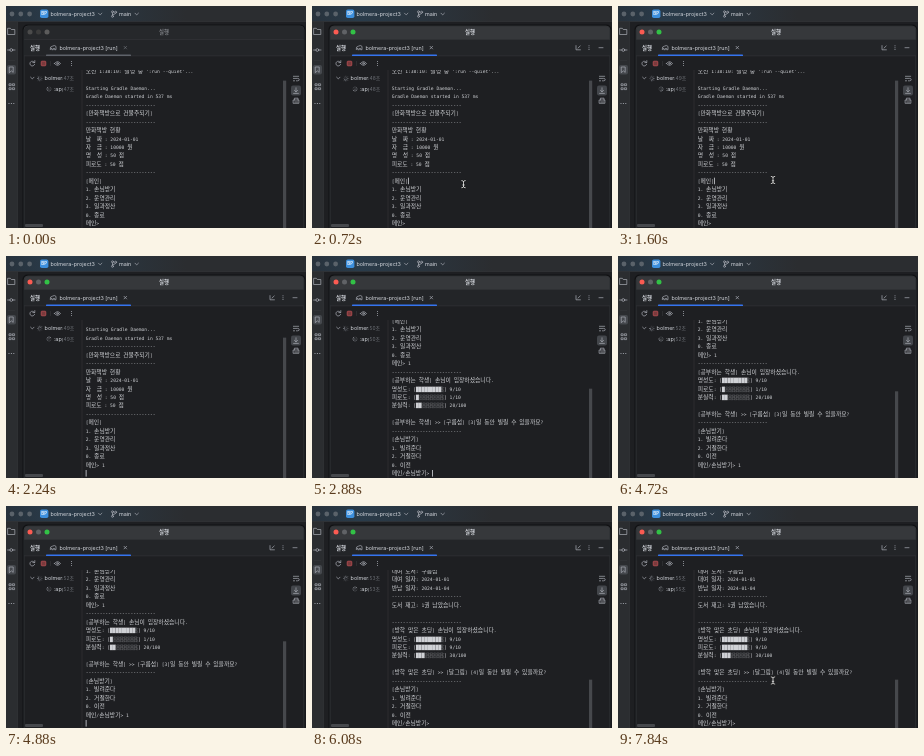
These frames come from a looping animation (300x222 px, 8000 ms). An HTML page:

```html
<!DOCTYPE html>
<html lang="ko">
<head>
<meta charset="utf-8">
<title>Run console</title>
<style>
html, body { margin: 0; width: 100%; height: 100%; overflow: hidden; background: #1e1f22; }
svg { display: block; width: 300px; height: 222px; }
text { white-space: pre; }
.ui { font-family: Inter, "Noto Sans CJK KR", "Noto Sans CJK", sans-serif; font-size: 5.4px; fill: #d5d8de; }
.dim { fill: #6d7076; }
.clock { font-size: 4.9px; }
.log { font-family: "DejaVu Sans Mono", "Liberation Mono", monospace; font-size: 4.65px; fill: #cfd1d5; }
.ko { font-family: "Noto Sans CJK KR", "Noto Sans CJK", sans-serif; font-size: 5.8px; }
.icon { fill: none; stroke: #a9adb5; stroke-width: .7; stroke-linecap: round; stroke-linejoin: round; }
.rule { stroke: #36383c; stroke-width: .6; }
.thumb { fill: #46484c; }
#title { fill: #36383b; }
#underline { fill: #3574f0; }
.idle #title { fill: #26282b; }
.idle #underline { fill: #5f636a; }
.idle #heading, .idle #close { opacity: .5; }
.idle #actions { display: none; }
.idle #lights { filter: grayscale(1) brightness(.6); }
</style>
</head>
<body>
<svg id="stage" viewBox="0 0 300 222">
  <defs>
    <linearGradient id="tint">
      <stop offset="0" stop-color="#28323c"/>
      <stop offset=".16" stop-color="#293b4a"/>
      <stop offset=".6" stop-color="#2b2d30"/>
    </linearGradient>
    <clipPath id="view"><path d="M76 64H283V222H76Z"/></clipPath>
    <clipPath id="tree"><path d="M20 64H56.5V100H20Z"/></clipPath>
  </defs>

  <!-- main window -->
  <rect width="300" height="222" fill="#1e1f22"/>
  <rect width="300" height="15.5" fill="url(#tint)"/>
  <rect y="15.5" width="11.5" height="207" fill="#2b2d30"/>
  <path class="rule" d="M0 15.5H300M11.5 15.5V222"/>
  <g fill="#5a626a"><circle cx="6" cy="8" r="2.4"/><circle cx="14.8" cy="8" r="2.4"/><circle cx="23.6" cy="8" r="2.4"/></g>
  <rect x="34" y="3.6" width="8.4" height="8.4" rx="1.8" fill="#3c8fdd"/>
  <text class="ui" x="38.2" y="9.4" text-anchor="middle" style="font-size:4.4px;font-weight:600;fill:#fff">BP</text>
  <text class="ui" x="44.5" y="9.8">bolmera-project3</text>
  <text class="ui" x="113" y="9.8">main</text>
  <g class="icon">
    <path d="M92.5 7.2l1.7 1.7 1.7-1.7M129 7.2l1.7 1.7 1.7-1.7"/>
    <circle cx="106.5" cy="5.8" r="1"/><circle cx="106.5" cy="10.3" r="1"/><circle cx="109.6" cy="6.2" r="1"/>
    <path d="M106.5 6.8V9.3M109.6 7.2q0 1.3-3 1.5"/>
    <path d="M2 22.3h2.3l1 1.2h3.5v5H2Z"/>
    <circle cx="5.3" cy="44" r="1.4"/><path d="M1.6 44h2.3M6.7 44h2.3"/>
    <path d="M3.4 77.8h1.8v1.8H3.4ZM6.8 77.8h1.8v1.8H6.8ZM3.4 81.8h1.8v1.8H3.4ZM6.8 81.8h1.8v1.8H6.8Z"/>
  </g>
  <path class="rule" d="M2 54.5H9"/>
  <rect x="1" y="59" width="9" height="9.5" rx="2" fill="#45484d"/>
  <path class="icon" d="M3.6 61h3.6v5.4l-1.8-1.5-1.8 1.5Z"/>
  <g fill="#a9adb5"><circle cx="3" cy="97.5" r=".6"/><circle cx="5.4" cy="97.5" r=".6"/><circle cx="7.8" cy="97.5" r=".6"/></g>

  <!-- run window -->
  <rect x="16.5" y="18.5" width="283" height="210" rx="5" fill="#111214"/>
  <rect x="18" y="20" width="280" height="210" rx="4" fill="#1e1f22" stroke="#46484c" stroke-width=".5"/>
  <path id="title" d="M18.3 33.5V24q0-3.7 3.7-3.7H294q3.7 0 3.7 3.7V33.5Z"/>
  <rect x="18.3" y="33.5" width="279.4" height="16" fill="#232528"/>
  <path class="rule" d="M18.3 33.5H297.7M18.3 49.8H297.7"/>
  <g id="lights">
    <circle cx="24" cy="26" r="2.5" fill="#fb5b52"/>
    <circle cx="32.5" cy="26" r="2.5" fill="#606266"/>
    <circle cx="41" cy="26" r="2.5" fill="#32c146"/>
  </g>
  <text id="heading" class="ui" x="158" y="27.8" text-anchor="middle" font-weight="600">실행</text>
  <text class="ui" x="24" y="43.7" font-weight="600">실행</text>
  <text class="ui" x="53.5" y="43.7">bolmera-project3 [run]</text>
  <rect id="underline" x="40" y="48.6" width="85" height="1.4" rx=".6"/>
  <g class="icon">
    <path d="M44.2 43.2q-.3-3 2.2-3 2-1.5 3.6.2v3.3h-1.4v-1.2h-1.3v1.2h-1.5v-1.1Z"/>
    <path id="close" d="M118 40.3l2.6 2.6M120.6 40.3l-2.6 2.6"/>
    <path d="M28.4 56.4a2.4 2.4 0 1 0 .2 2M28.8 54.6v2h-2"/>
    <path d="M48.5 57.5q3-3.8 6 0-3 3.8-6 0Z"/><circle cx="51.5" cy="57.5" r=".8"/>
    <path d="M24.6 71.2l1.7 1.7 1.7-1.7"/>
  </g>
  <g id="actions">
    <path class="icon" d="M264 39.6v4.2h4.4M268.2 40l-2.2 2.1"/>
    <path class="icon" d="M287 41.7h4"/>
    <g fill="#a9adb5"><circle cx="277" cy="39.8" r=".5"/><circle cx="277" cy="41.7" r=".5"/><circle cx="277" cy="43.6" r=".5"/></g>
  </g>
  <g fill="#a9adb5"><circle cx="65.5" cy="55.6" r=".5"/><circle cx="65.5" cy="57.5" r=".5"/><circle cx="65.5" cy="59.4" r=".5"/></g>
  <rect x="35.2" y="55.2" width="4.6" height="4.6" rx=".7" fill="#7a3a3c" stroke="#c9555a" stroke-width=".7"/>
  <path class="rule" d="M44.5 55V60M76 64V222"/>

  <!-- task tree -->
  <g clip-path="url(#tree)">
    <text class="ui" x="38.6" y="74.4">bolmera</text>
    <text class="ui" x="47.8" y="84.9">:app</text>
  </g>
  <text class="ui dim clock" x="57.5" y="74.3"></text>
  <text class="ui dim clock" x="57.5" y="84.8"></text>
  <g id="spinners"></g>
  <rect class="thumb" x="19" y="218" width="18" height="3" rx="1"/>

  <!-- console -->
  <g clip-path="url(#view)">
    <g id="log"></g>
    <rect id="caret" width=".8" height="6.6" fill="#d5d8de"/>
  </g>
  <rect id="scroll" class="thumb" x="277" width="3.2"/>
  <rect x="285" y="79.5" width="10" height="10" rx="2" fill="#43464b"/>
  <g class="icon">
    <path d="M287.4 70.3h5.3M287.4 72.4h4.2q1.6 0 1.6 1.2t-1.6 1.2h-1.2M287.4 74.8h1.2"/>
    <path d="M290 81.8v4M288.4 84.3l1.6 1.6 1.6-1.6M287.6 87.4h4.8"/>
    <path d="M288.4 94v-1.8h3.6V94M287.5 94h5.4v3.3h-5.4ZM288.7 96h3"/>
  </g>
  <g id="mouse" fill="none" stroke-linecap="round">
    <path id="beam" d="M-1.8-3.6Q0-3.6 0-2.4Q0-3.6 1.8-3.6M0-2.4V2.4M-1.8 3.6Q0 3.6 0 2.4Q0 3.6 1.8 3.6M-.8.8H.8" stroke="#111" stroke-width="1.7"/>
    <path d="M-1.8-3.6Q0-3.6 0-2.4Q0-3.6 1.8-3.6M0-2.4V2.4M-1.8 3.6Q0 3.6 0 2.4Q0 3.6 1.8 3.6M-.8.8H.8" stroke="#eee" stroke-width=".8"/>
  </g>
</svg>
<script>
const LOOP = 8000, PITCH = 8.47, LEFT = 79.7, LAST = 219.2, VIEW = 158, BOTTOM = 222;
const $ = id => document.getElementById(id);
const make = (tag, attrs, parent) => {
  const el = document.createElementNS('http://www.w3.org/2000/svg', tag);
  for (const key in attrs) el.setAttribute(key, attrs[key]);
  return parent.appendChild(el);
};

const dash = '-'.repeat(25);
const meter = (name, value, max) => {
  const full = Math.round(value / max * 10);
  return `${name}: [${'█'.repeat(full)}${'░'.repeat(10 - full)}] ${value}/${max}`;
};
const visit = (who, book, days, stats) => [
  dash, `[${who}] 손님이 입장하셨습니다.`,
  meter('명성도', stats[0], 10), meter('피로도', stats[1], 10), meter('분실력', stats[2], 100), '',
  `[${who}] >> [${book}] [${days}]일 동안 빌릴 수 있을까요?`, dash,
  '[손님받기]', '1. 빌려준다', '2. 거절한다', '0. 이전'
];
const home = '메인> ', guest = '메인/손님받기> ';
const intro = [
  "오전 1:38:10: 실행 중 ':run --quiet'...", '',
  'Starting Gradle Daemon...', 'Gradle Daemon started in 537 ms',
  dash, '[만화책방으로 건물주되기]', dash,
  '만화책방 현황', '날  짜 : 2024-01-01', '자  금 : 10000 원', '명  성 : 50 점', '피로도 : 50 점',
  dash, '[메인]', '1. 손님받기', '2. 운영관리', '3. 일과정산', '0. 종료'
];
const first = [...intro, home + '1', ...visit('공부하는 학생', '구름섬', 3, [9, 1, 20])];
const second = [
  ...first, guest + '1', dash, '대여 도서: 구름섬', '대여 일자: 2024-01-01', '반납 일자: 2024-01-04',
  dash, '도서 재고: 1권 남았습니다.', '', ...visit('방학 맞은 초딩', '달그림', 4, [9, 9, 30])
];

// start time, caret blink origin, total lines, lines, caret line counted from the bottom
const steps = [
  [0, -920, 20, [...intro, home]],
  [480, 480, 20, [...intro, home], 5],
  [1760, 1760, 20, [...intro, home + '1']],
  [1920, 1920, 21, [...intro, home + '1', '']],
  [2560, 2560, 33, [...first, guest]],
  [3440, 3440, 33, [...first, guest + '1']],
  [3760, 3760, 34, [...first, guest + '1', '']],
  [4960, 5180, 61, [...second, guest]]
].map(([start, origin, total, lines, up = 0]) => ({ start, origin, total, lines: lines.slice(-20), up }));

const rows = Array.from({ length: 20 }, () => make('text', { class: 'log', x: LEFT }, $('log')));
function write(row, line) {
  row.textContent = '';
  for (const run of line.match(/[가-힣]+|[^가-힣]+/g) || []) {
    make('tspan', { class: /[가-힣]/.test(run) ? 'ko' : '' }, row).textContent = run;
  }
}
let shown;
function show(step) {
  if (step === shown) return;
  shown = step;
  const { lines, up, total } = step;
  rows.forEach((row, i) => {
    row.setAttribute('y', LAST - (lines.length - 1 - i) * PITCH);
    write(row, lines[i] || '');
  });
  const length = rows[lines.length - 1 - up].getComputedTextLength();
  $('caret').setAttribute('x', LEFT + length);
  $('caret').setAttribute('y', LAST - 5.2 - up * PITCH);
  const thumb = Math.min(VIEW, VIEW * VIEW / (total * PITCH));
  $('scroll').setAttribute('y', BOTTOM - thumb);
  $('scroll').setAttribute('height', thumb);
}

const spinners = [[33.8, 72.5], [43, 83]].map(([x, y]) => {
  const g = make('g', {}, $('spinners'));
  for (let i = 0; i < 8; i++) {
    make('path', {
      d: 'M0-1.3V-2.4', stroke: '#a9adb5', 'stroke-width': .65, 'stroke-linecap': 'round',
      opacity: .2 + i * .1, transform: `rotate(${i * 45})`
    }, g);
  }
  return { g, x, y };
});

// appear, settle, hide, start and rest position
const moves = [[480, 1280, 1760, 150, 180, 155, 174], [7400, 7600, LOOP, 157, 177, 155, 174.5]];
function placeMouse(t) {
  const move = moves.find(m => t >= m[0] && t < m[2]);
  $('mouse').style.display = move ? '' : 'none';
  if (!move) return;
  const [from, rest, , x0, y0, x1, y1] = move;
  const p = Math.min(1, (t - from) / (rest - from));
  $('mouse').setAttribute('transform', `translate(${x0 + (x1 - x0) * p} ${y0 + (y1 - y0) * p})`);
}

function draw(t) {
  const step = steps.findLast(s => t >= s.start);
  show(step);
  const on = Math.floor((t - step.origin) / 520) % 2 === 0;
  $('caret').style.display = on ? '' : 'none';
  $('stage').classList.toggle('idle', t < 160);

  const seconds = Math.floor(47 + (t + 560) / 1000) + '초';
  document.querySelectorAll('.clock').forEach(el => {
    if (el.textContent !== seconds) el.textContent = seconds;
  });
  const turn = Math.floor(t / 120) % 8 * 45;
  spinners.forEach(({ g, x, y }) => g.setAttribute('transform', `translate(${x} ${y}) rotate(${turn})`));
  placeMouse(t);
}

const begin = performance.now();
function tick() {
  draw((performance.now() - begin) % LOOP);
  requestAnimationFrame(tick);
}
tick();
</script>
</body>
</html>
```
